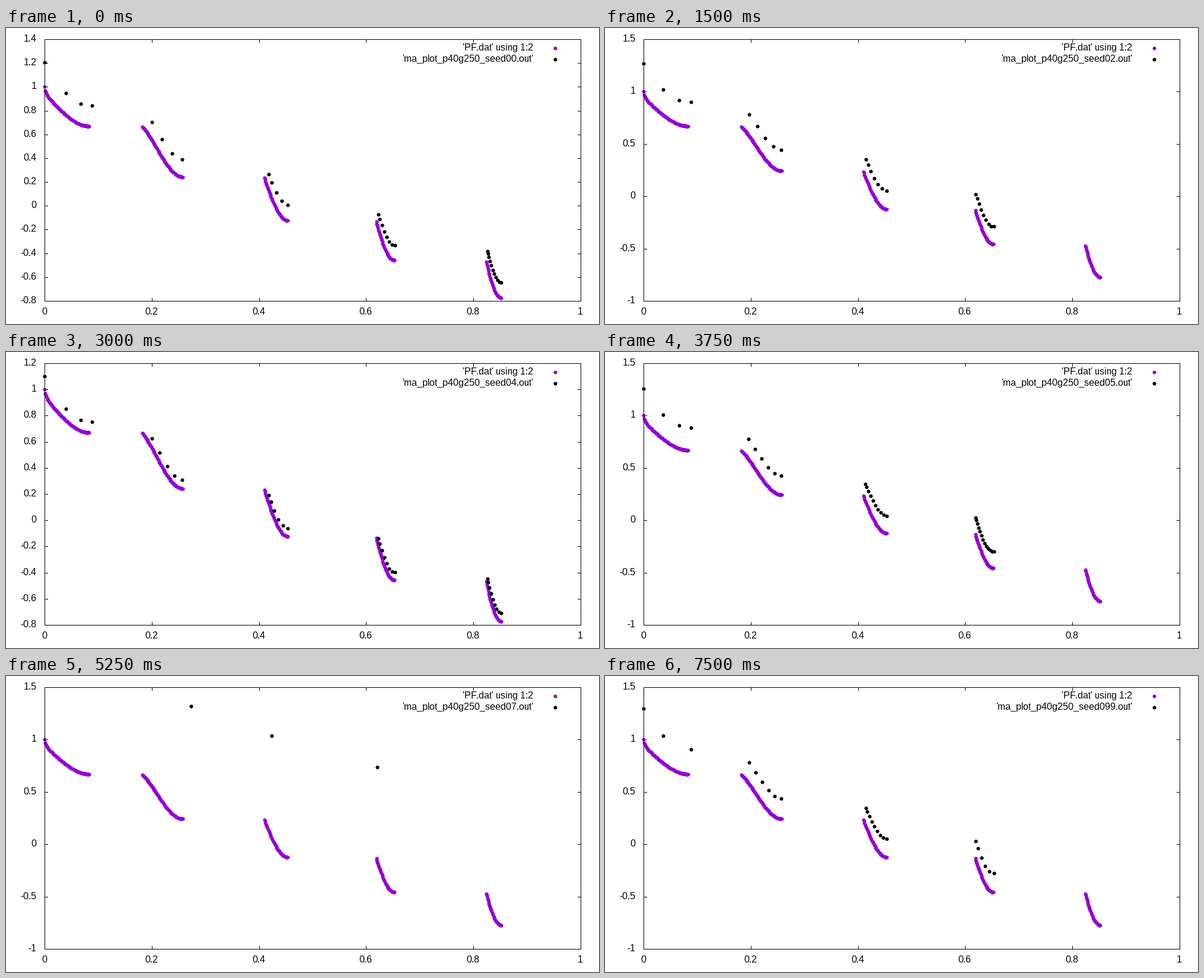
Recreate the animation shown at these times as a matplotlib script. Size 1000 by 500 pixels, loop 8 s.

```python
import numpy as np
import matplotlib.pyplot as plt
from matplotlib.animation import FuncAnimation
from matplotlib.collections import PolyCollection

plt.rcParams["font.family"] = "Liberation Sans"
plt.rcParams["text.hinting"] = "default"
plt.rcParams["text.hinting_factor"] = 1  # whole-pixel advances

W, H, DPI = 1000, 500, 100
LEFT, RIGHT, TOP, BOTTOM = 65, 969, 19, 461
PURPLE, BLACK = "#9400d3", "#000000"
FONT = 16 * 72 / DPI
STEP_MS, HOLD = 250, 3  # each run is held for three steps

# Filled dot: one side of a 5x5 block with a nub, turned four times
SIDE = np.array([(-2.5, -2.5), (-.5, -2.5), (-.5, -3.5),
                 (.5, -3.5), (.5, -2.5)])
TURN = np.array([(0, 1), (-1, 0)])
DOT = .5 + np.concatenate([SIDE @ np.linalg.matrix_power(TURN, k)
                           for k in range(4)])


def pareto(f, g=1.0):
    """Second objective of the test problem for distance factor g."""
    return g - np.sqrt(f * g) - f * np.sin(10 * np.pi * f)


# The true front: grid points that no earlier point dominates
grid = np.arange(1001) / 1000
curve = pareto(grid)
best = np.minimum.accumulate(np.append(np.inf, curve))[:-1]
front_x, front_y = grid[curve < best], curve[curve < best]

# Where a run covers each piece of the front, and how its points bunch up
STARTS = (.040, .200, .418, .623, .826)
ENDS = (.088, .257, .453, .654, .852)
BOWS = (.8, 1, 1.3, 1.3, 1.4)


def spread(counts, lead=0.0):
    """First objectives: zero, then n bowed steps over each piece."""
    parts = [[0.0]]
    for n, a, b, bow in zip(counts, STARTS, ENDS, BOWS):
        a -= lead
        parts.append(a + (b - a) * np.linspace(0, 1, n) ** bow)
    return np.concatenate(parts)


# Name, y range, first objectives, distance factor and its bend
RUNS = [
    ("00", -.8, 1.4, spread((3, 4, 5, 8, 11)), 1.192, .14),
    ("01", -.8, 1.2, spread((3, 5, 6, 8, 9)), 1.090, .11),
    ("02", -1, 1.5, spread((3, 5, 7, 9), .003), 1.260, .10),
    ("03", -.8, 1.4, spread((2, 4, 5, 8, 11)), 1.203, .16),
    ("04", -.8, 1.2, spread((3, 5, 6, 8, 9)), 1.090, .10),
    ("05", -1, 1.5, spread((3, 6, 10, 13), .004), 1.240, .15),
    ("06", -.8, 1.4, spread((3, 4, 5, 8, 10)), 1.200, .10),
    ("07", -1, 1.5, np.array([.273, .424, .621]), 2.318, 0),
    ("08", -.8, 1.2, spread((3, 5, 8, 10), .004), 1.084, .05),
    ("09", -.8, 1.2, spread((3, 6, 9, 12), .004), 1.012, .05),
    ("099", -1, 1.5, spread((2, 6, 9, 6), .003), 1.252, .40),
]

fig = plt.figure(figsize=(W / DPI, H / DPI), dpi=DPI, facecolor="white")
ax = fig.add_axes([0, 0, 1, 1])


def pixel(v):
    return np.floor(np.asarray(v) + .5).astype(int)


def to_x(f):
    return pixel(LEFT + f * (RIGHT - LEFT))


def to_y(v, lo, hi):
    return pixel(BOTTOM - (v - lo) / (hi - lo) * (BOTTOM - TOP))


def bar(x0, y0, x1, y1):
    """Filled block that covers both end pixels."""
    return [(x0, y0), (x1 + 1, y0), (x1 + 1, y1 + 1), (x0, y1 + 1)]


def fill(polys, color, z):
    ax.add_collection(PolyCollection(polys, facecolors=color, linewidths=0,
                                     edgecolors="none", antialiaseds=False,
                                     snap=False, zorder=z), autolim=False)


def dots(xs, ys, color, z):
    fill([DOT + p for p in zip(xs, ys)], color, z)


def label(x, y, text, align):
    ax.text(x, y, text, ha=align, va="baseline", fontsize=FONT, color=BLACK)


def draw(i):
    name, lo, hi, f, base, bend = RUNS[min(i // HOLD, len(RUNS) - 1)]
    ax.clear()
    ax.set(xlim=(0, W), ylim=(H, 0))
    ax.axis("off")

    tics = []
    for v in np.arange(6) / 5:
        x = to_x(v)
        tics += [bar(x, TOP, x, TOP + 5), bar(x, BOTTOM - 5, x, BOTTOM)]
        label(x - .4, 484, f"{v:g}", "center")
    step = .5 if hi == 1.5 else .2
    for k in range(round(lo / step), round(hi / step) + 1):
        y = to_y(k * step, lo, hi)
        tics += [bar(LEFT, y, LEFT + 5, y), bar(RIGHT - 5, y, RIGHT, y)]
        label(51.4, y + 4, f"{round(k * step, 1):g}", "right")
    fill(tics, BLACK, 1)

    found = pareto(f, base + bend * (f - .33) ** 2)
    dots(to_x(front_x), to_y(front_y, lo, hi), PURPLE, 2)
    dots(to_x(f), to_y(found, lo, hi), BLACK, 3)
    fill([bar(LEFT, TOP, RIGHT, TOP), bar(LEFT, BOTTOM, RIGHT, BOTTOM),
          bar(LEFT, TOP, LEFT, BOTTOM), bar(RIGHT, TOP, RIGHT, BOTTOM)],
         BLACK, 4)

    keys = [("'PF.dat' using 1:2", PURPLE),
            (f"'ma_plot_p40g250_seed{name}.out'", BLACK)]
    for y, (text, color) in zip((34, 53), keys):
        label(889.3, y + 4, text, "right")
        dots([926], [y], color, 5)
    return []


anim = FuncAnimation(fig, draw, frames=32, interval=STEP_MS,
                     init_func=lambda: draw(0), repeat=True, repeat_delay=0)
plt.show()
```
